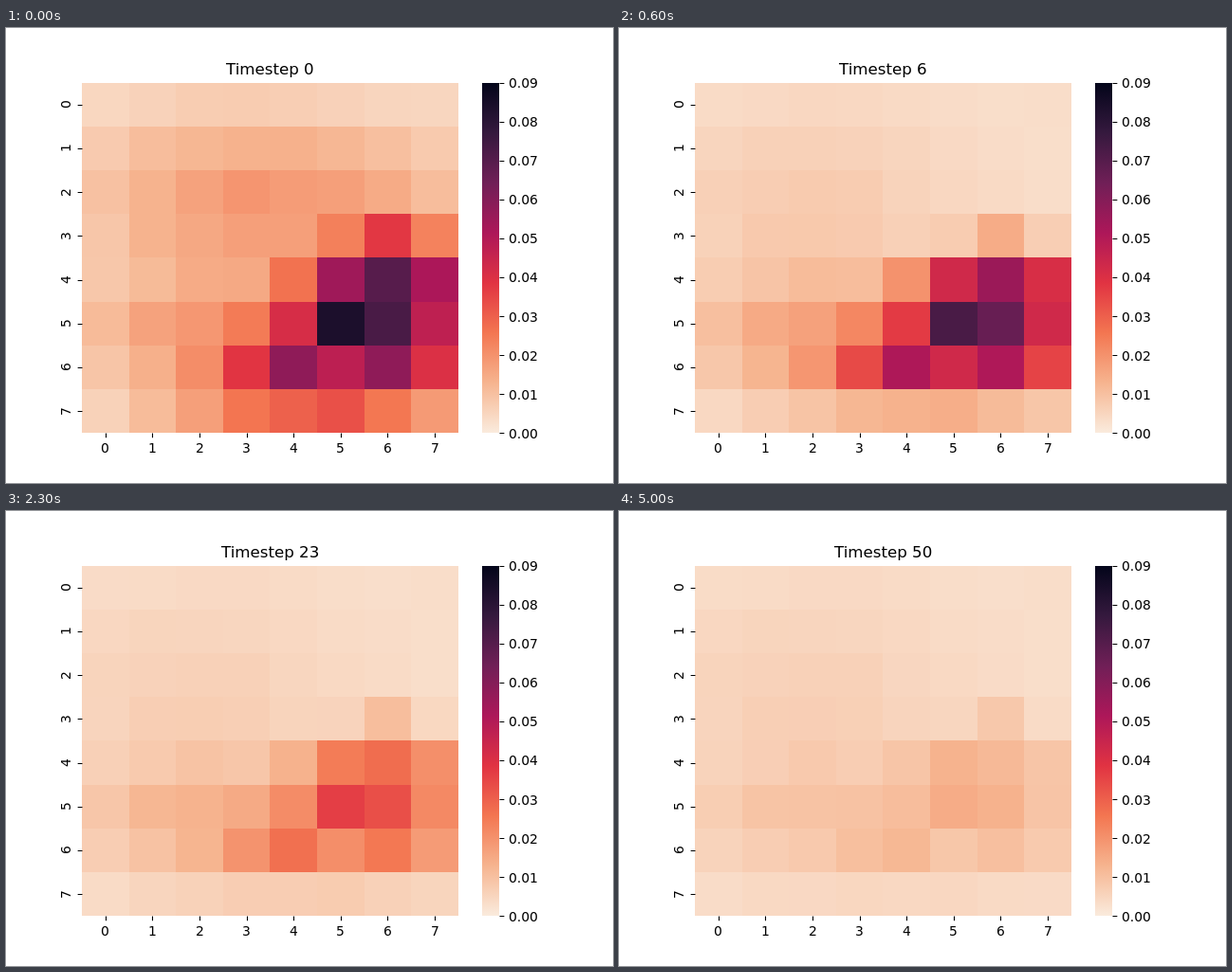
An HTML page for the animation above (5.1 s loop, 640 px wide and 480 px high).

```html
<!DOCTYPE html>
<html lang="en">
<head>
<meta charset="utf-8">
<title>Heatmap over time</title>
<style>
  html, body { margin: 0; width: 100%; height: 100%; overflow: hidden; background: #fff; }
  svg { display: block; }
  text { font: 13.89px "DejaVu Sans", sans-serif; fill: #000; }
  #title { font-size: 16.67px; }
  #cells, #bar { shape-rendering: crispEdges; }
  #ticks { stroke: #000; stroke-width: 1.1; fill: none; }
</style>
</head>
<body>
<svg width="640" height="480" viewBox="0 0 640 480">
  <defs><linearGradient id="scale" x1="0" y1="1" x2="0" y2="0"></linearGradient></defs>
  <g id="cells"></g>
  <rect id="bar" x="502" y="58" width="18" height="369" fill="url(#scale)"/>
  <path id="ticks"/>
  <g id="labels"></g>
  <text id="title" y="49"></text>
</svg>
<script>
const N = 8, LAST = 50, STEP_MS = 100;
const LEFT = 80, TOP = 57.6, CELL_W = 49.6, CELL_H = 46.2, MAX = 90;
const RAMP = ["#faebdd", "#f6b48f", "#f37651", "#e13342", "#ad1759", "#701f57", "#35193e", "#03051a"];

// Fading hills on the map, heights in thousandths
const FLOOR = 3;
const HILLS = [
  { row: 2.5, col: 2, height: 3.5, tall: 1.6, wide: 2.2, life: Infinity },
  { row: 2, col: 2, height: 6, tall: 1.3, wide: 1.8, life: 4 },
  { row: 2.2, col: 5, height: 12, tall: 1.2, wide: 2.2, life: 1.3 },
  { row: 5.2, col: 2, height: 13, tall: .9, wide: 1.8, life: 60 },
  { row: 5, col: 5, height: 18, tall: .35, wide: .35, life: 20 },
  { row: 6, col: 5, height: -16, tall: .35, wide: .35, life: 30 },
  { row: 4, col: 4.7, height: 8, tall: .4, wide: .5, life: 99 },
  { row: 3, col: 6, height: 7, tall: .4, wide: .4, life: 99 }
];

const $ = id => document.getElementById(id);
const bell = d => Math.exp(-d * d / 2);

function add(parent, tag, attrs, text = "") {
  const el = document.createElementNS("http://www.w3.org/2000/svg", tag);
  for (const k in attrs) el.setAttribute(k, attrs[k]);
  el.textContent = text;
  return $(parent).appendChild(el);
}

// Repeatable random number in 0..1
function random(seed) {
  const x = Math.sin(seed * 12.9898 + 4.1) * 43758.5453;
  return x - Math.floor(x);
}

// The hot core bends left and widens downwards, thins early and cools late
function core(row, col, step) {
  const down = row - 3;
  const middle = 6.2 - .1 * down * down;
  const width = .9 + .28 * down;
  const height = 1.6 + .4 * Math.exp(-step / 3);
  const heat = 64 / (1 + (step / 20) ** 2);
  return heat * bell((col - middle) / width) * Math.exp(-(((row - 5.1) / height) ** 4));
}

function valueAt(row, col, step) {
  let v = FLOOR + core(row, col, step);
  for (const h of HILLS) {
    v += h.height * bell((row - h.row) / h.tall) * bell((col - h.col) / h.wide) * Math.exp(-step / h.life);
  }
  return v * (.93 + .14 * random(row * N + col));
}

const channels = hex => [1, 3, 5].map(i => parseInt(hex.slice(i, i + 2), 16));

function colour(value) {
  const p = Math.min(value / MAX, 1) * (RAMP.length - 1);
  const i = Math.min(Math.floor(p), RAMP.length - 2);
  const a = channels(RAMP[i]), b = channels(RAMP[i + 1]);
  return `rgb(${a.map((c, k) => Math.round(c + (b[k] - c) * (p - i)))})`;
}

RAMP.forEach((c, i) => add("scale", "stop", { offset: i / (RAMP.length - 1), "stop-color": c }));

const edgeX = i => Math.round(LEFT + i * CELL_W);
const edgeY = i => Math.round(TOP + i * CELL_H);
const cells = [];
let ticks = "";

for (let row = 0; row < N; row++) {
  for (let col = 0; col < N; col++) {
    const x = edgeX(col), y = edgeY(row);
    const el = add("cells", "rect", { x, y, width: edgeX(col + 1) - x, height: edgeY(row + 1) - y });
    cells.push({ row, col, el });
  }
}

// Labels start on whole pixels
const HALF_DIGIT = 4.45;
for (let i = 0; i < N; i++) {
  const x = LEFT + (i + .5) * CELL_W, y = TOP + (i + .5) * CELL_H;
  ticks += `M${Math.round(x) + .5} 427.5v4.86M80.5 ${Math.round(y) + .5}h-4.86`;
  add("labels", "text", { x: Math.round(x - HALF_DIGIT), y: 448 }, i);
  add("labels", "text", { transform: `translate(68 ${Math.round(y + HALF_DIGIT)}) rotate(-90)` }, i);
}
for (let i = 0; i < 10; i++) {
  const y = TOP + (9 - i) * N * CELL_H / 9;
  ticks += `M520.5 ${Math.round(y) + .5}h4.86`;
  add("labels", "text", { x: 530, y: Math.round(y + 5.5) }, (i / 100).toFixed(2));
}
$("ticks").setAttribute("d", ticks);

const title = $("title");
let shown = -1;
function draw() {
  const step = Math.floor(performance.now() / STEP_MS) % (LAST + 1);
  if (step !== shown) {
    shown = step;
    title.textContent = `Timestep ${step}`;
    title.setAttribute("x", Math.round(LEFT + N * CELL_W / 2 - title.getComputedTextLength() / 2));
    for (const { row, col, el } of cells) el.setAttribute("fill", colour(valueAt(row, col, step)));
  }
  requestAnimationFrame(draw);
}
draw();
</script>
</body>
</html>
```
